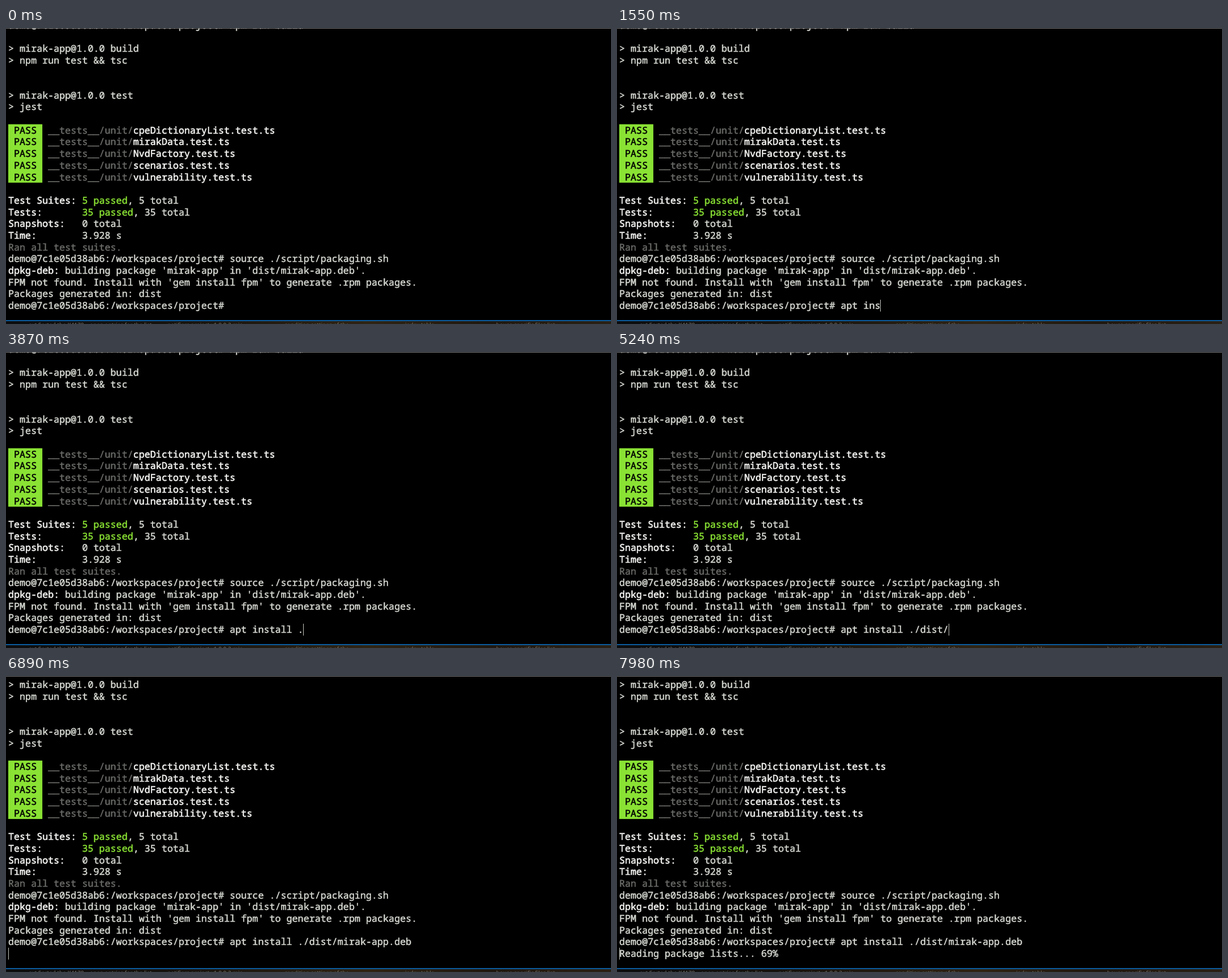
Recreate the animation shown at these times as an HTML page. Size 1069 by 524 pixels, loop 8 s.

```html
<!DOCTYPE html>
<html lang="en">
<head>
<meta charset="utf-8">
<title>Terminal</title>
<style>
  html, body { margin: 0; width: 100%; height: 100%; overflow: hidden; background: #000; }
  svg { display: block; width: 100vw; height: 100vh; }
  text {
    font: 500 16.725px "Noto Sans Mono", "DejaVu Sans Mono", monospace;
    font-variant-ligatures: none;
    text-rendering: geometricPrecision;
    white-space: pre;
    color: #d6d9d2;
    stroke-width: .5;
  }
  text, tspan { fill: currentColor; stroke: currentColor; }
  .bright { color: #f0f0ee; stroke-width: .65; }
  .dim { color: #696b67; }
  .green { color: #8ae234; }
  .badge { color: #000; }
  .tiny { font: 10px "Noto Sans", sans-serif; color: #77736a; stroke: none; }
</style>
</head>
<body>
<svg id="stage" viewBox="0 0 1069 524">
  <defs>
    <linearGradient id="wall">
      <stop offset="0" stop-color="#0c0d0f"/>
      <stop offset=".3" stop-color="#17140f"/>
      <stop offset=".6" stop-color="#2f2414"/>
      <stop offset=".8" stop-color="#1f1810"/>
      <stop offset="1" stop-color="#2a2115"/>
    </linearGradient>
  </defs>
  <rect width="1069" height="524"/>
  <g id="screen"></g>
  <rect width="1069" height="1" fill="#777"/>
  <text id="status" x="4" y="497"></text>
  <rect id="cursor" y="481" width="1" height="21" fill="#c4c7c0"/>
  <g id="desk">
    <rect y="519" width="1069" height="5" fill="url(#wall)"/>
    <rect y="517" width="1069" height="2" fill="#0b5c9e"/>
  </g>
</svg>
<script>
const LOOP = 8000, LEFT = 4, CHAR = 10.035, LINE = 20.68, BASE = 0.68;
const PROMPT = 'demo@7c1e05d38ab6:/workspaces/project# ';
const COMMAND = 'apt install ./dist/mirak-app.deb ';

const $ = id => document.getElementById(id);

function add(parent, tag, attrs, content = '') {
  const el = document.createElementNS('http://www.w3.org/2000/svg', tag);
  for (const key in attrs) el.setAttribute(key, attrs[key]);
  el.textContent = content;
  return parent.appendChild(el);
}

const span = name => text => [name, text];
const plain = span('plain'), bright = span('bright'), dim = span('dim');
const green = span('green'), badge = span('badge');

const suite = file => [badge(' PASS '), plain(' '), dim('__tests__/unit/'), bright(file + '.test.ts')];
const total = (label, passed, rest) => [bright(label.padEnd(13)), green(passed), plain(rest)];

const rows = [
  [plain(PROMPT + 'npm run build')],
  [],
  [plain('> mirak-app@1.0.0 build')],
  [plain('> npm run test && tsc')],
  [],
  [],
  [plain('> mirak-app@1.0.0 test')],
  [plain('> jest')],
  [],
  ...['cpeDictionaryList', 'mirakData', 'NvdFactory', 'scenarios', 'vulnerability'].map(suite),
  [],
  total('Test Suites:', '5 passed', ', 5 total'),
  total('Tests:', '35 passed', ', 35 total'),
  total('Snapshots:', '', '0 total'),
  total('Time:', '', '3.928 s'),
  [dim('Ran all test suites.')],
  [plain(PROMPT + 'source ./script/packaging.sh')],
  [bright('dpkg-deb:'), plain(" building package 'mirak-app' in 'dist/mirak-app.deb'.")],
  [plain("FPM not found. Install with 'gem install fpm' to generate .rpm packages.")],
  [plain('Packages generated in: dist')],
  [plain(PROMPT)]
];

const screen = $('screen');
add(screen, 'rect', { fill: '#8ae234', x: LEFT, y: 170.4, width: 6 * CHAR, height: 5 * LINE });
let promptLine;
rows.forEach((spans, i) => {
  promptLine = add(screen, 'text', { x: LEFT, y: BASE + i * LINE });
  for (const [name, text] of spans) add(promptLine, 'tspan', { class: name }, text);
});
const typed = add(promptLine, 'tspan', {});

// Desktop text cut off below the window
[[40, 'ext Sorted the K4170'], [148, 'open entries for the list'], [285, 'notifiers project v1.0.0.2 min'],
 [492, 'condition settings of the'], [705, 'index table'], [866, 'house specific files list']]
  .forEach(([x, text]) => add($('desk'), 'text', { class: 'tiny', x, y: 529 }, text));

// [time, characters typed]
const typing = [
  [0, 0], [410, 1], [510, 2], [680, 3], [980, 4], [1130, 5], [1380, 6], [1550, 7], [1800, 8],
  [1950, 9], [2560, 10], [2710, 11], [3470, 12], [3870, 13], [4280, 14], [4780, 15],
  [5240, 19], [5740, 33]
];
const progress = [[0, ''], [7040, 0], [7260, 4], [7560, 13], [7660, 27], [7810, 41], [7900, 55], [7980, 69]];
const hidden = [[0, 260], [3270, 3470], [6350, 6890], [7560, 7660]];
const ENTER = 6890;

const at = (steps, t) => steps.filter(([start]) => start <= t).pop()[1];

function draw(t) {
  const count = at(typing, t), percent = at(progress, t), entered = t >= ENTER;
  const column = entered ? 0 : PROMPT.length + count;
  typed.textContent = COMMAND.slice(0, count);
  screen.setAttribute('transform', `translate(0 ${entered ? -LINE : 0})`);
  $('status').textContent = percent === '' ? '' : `Reading package lists... ${percent}%`;
  $('cursor').setAttribute('x', Math.floor(LEFT + column * CHAR));
  $('cursor').setAttribute('opacity', hidden.some(([a, b]) => t >= a && t < b) ? 0 : 1);
}

const start = performance.now();
function tick() {
  draw((performance.now() - start) % LOOP);
  requestAnimationFrame(tick);
}
tick();
</script>
</body>
</html>
```
